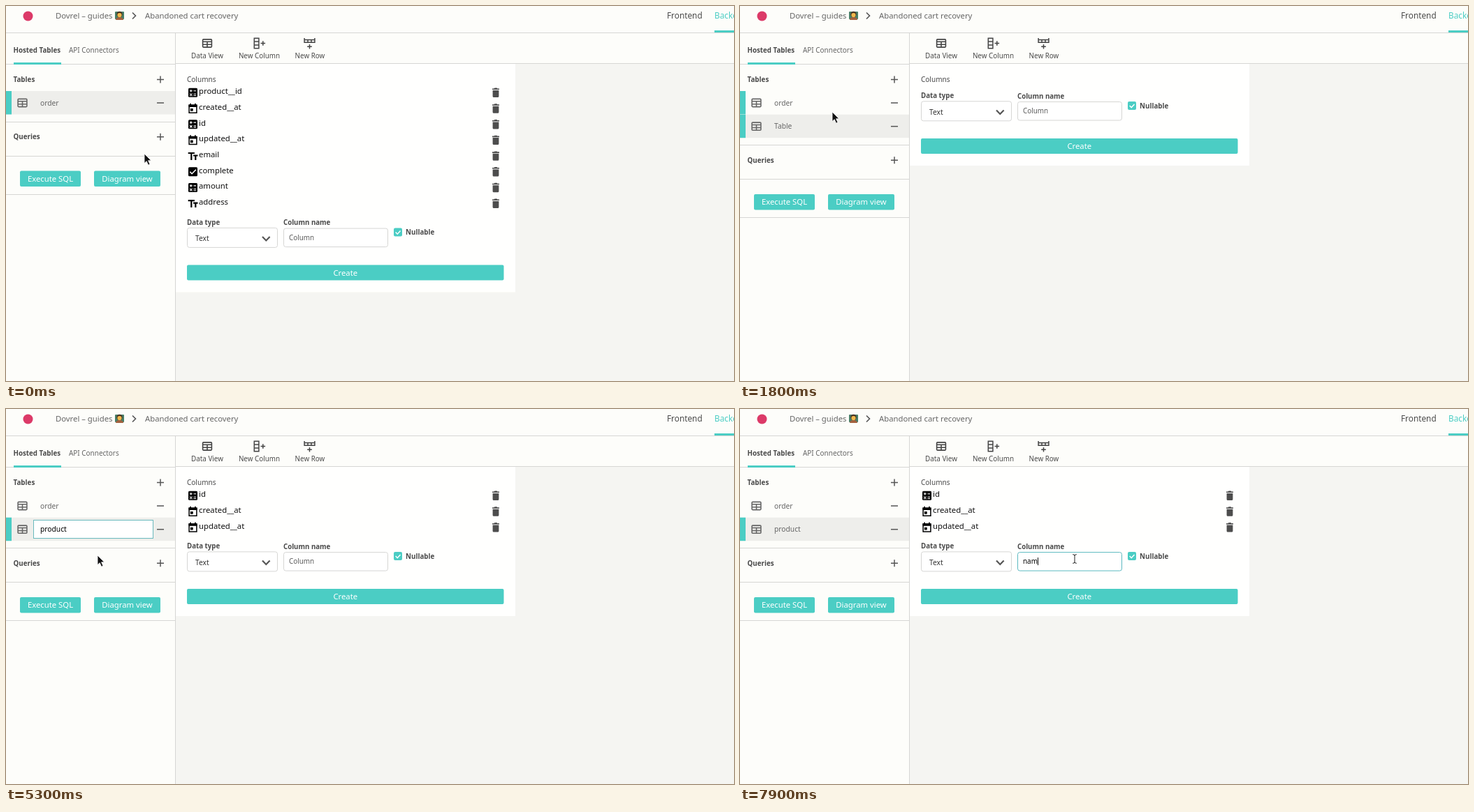
Animation of 1042 by 538 pixels, one loop 8 s. Source, as an HTML page:

```html
<!DOCTYPE html>
<html lang="en">
<head>
<meta charset="utf-8">
<title>Table editor</title>
<style>
html, body { margin: 0; width: 100%; height: 100%; overflow: hidden; background: #f5f5f2; }
svg { display: block; width: 1042px; height: 538px; font-family: "Noto Sans", "Open Sans", sans-serif; }
</style>
</head>
<body>
<svg id="stage" viewBox="0 0 1042 538" xmlns="http://www.w3.org/2000/svg">
  <defs>
    <g id="plus"><path d="M-5 0H5M0-5V5" fill="none" stroke-width="1.5"/></g>
    <g id="minus"><path d="M-5 0H5" fill="none" stroke="#555" stroke-width="1.5"/></g>
    <g id="grid" fill="none" stroke-width="1.6">
      <rect x="-6.4" y="-5.6" width="12.8" height="11.2" rx="1"/>
      <path d="M-6.4-2.2H6.4M-6.4 1.8H6.4M0-2.2V5.6"/>
    </g>
    <g id="addColumn" fill="none" stroke="#444" stroke-width="1.5">
      <path d="M-7.2-7.2H-.6V7.2H-7.2ZM-7.2-2.4H-.6M-7.2 2.4H-.6M2 0H8.6M5.3-3.3V3.3"/>
    </g>
    <g id="addRow" fill="none" stroke="#444" stroke-width="1.5">
      <path d="M-7.4-7.6V-1.2H7.4V-7.6M-7.4-5H7.4M-2.5-5V-1.2M2.5-5V-1.2M0 1.5V8M-3.3 4.8H3.3"/>
    </g>
    <g id="number">
      <rect x="-6.5" y="-6.5" width="13" height="13" rx="1.5"/>
      <path d="M-4.6-2.6H-.8M-2.7-4.5V-.7M1-2.6H4.6M-4.4 1.4L-1 4.8M-1 1.4L-4.4 4.8M1 2H4.6M1 4.2H4.6" stroke="#fff" stroke-width="1.1"/>
    </g>
    <g id="date">
      <path d="M-5.4-4.8H5.4V6.2H-5.4Z" fill="none" stroke="#000" stroke-width="1.5"/>
      <path d="M-6-5.4H6V-2H-6ZM-4.2-7.2H-2.6V-5H-4.2ZM2.6-7.2H4.2V-5H2.6ZM-3.6 0H.2V3.8H-3.6Z"/>
    </g>
    <g id="text">
      <path d="M-6.8-5.2H2.4V-3H-1.1V5.8H-3.3V-3H-6.8ZM.6-1.7H7V.5H4.9V5.8H2.7V.5H.6Z"/>
    </g>
    <g id="bool">
      <rect x="-6.5" y="-6.5" width="13" height="13" rx="1.5"/>
      <path d="M-4.2 0L-1.4 2.9L4.4-3" fill="none" stroke="#fff" stroke-width="1.6"/>
    </g>
    <g id="trash" fill="#4d4d4d">
      <path d="M-5-5.8H-2.5L-1.6-6.7H1.6L2.5-5.8H5V-4.2H-5ZM-4.4-3.3H4.4V5.2Q4.4 6.7 2.9 6.7H-2.9Q-4.4 6.7-4.4 5.2Z"/>
    </g>
    <g id="arrow">
      <path d="M0 0V13.6L3.2 10.7L5.6 16.2L8 15.1L5.6 9.8H9.8Z" fill="#111" stroke="#fff" stroke-width=".8"/>
    </g>
    <g id="hand">
      <path d="M-1.5 1Q0-.7 1.3 1V5Q2.5 3.9 3.5 5.2Q4.8 4.3 5.7 5.7Q7.6 5.2 7.6 7.3V9.6Q7.3 11.3 6.4 12.9H-.2Q-2-9.9-.2 12.9Q-1.7 10.2-4.5 7.4Q-4.2 5.2-1.5 7.5Z" fill="#fff" stroke="#222" stroke-width="1.1" stroke-linejoin="round"/>
    </g>
    <g id="beam">
      <path d="M-2.8-6.3Q0-6.3 0-4.8Q0-6.3 2.8-6.3M0-5V5M-2.8 6.3Q0 6.3 0 4.8Q0 6.3 2.8 6.3" fill="none" stroke="#222"/>
    </g>
  </defs>
  <g id="scene"></g>
</svg>
<script>
const TEAL = '#4bcdc4', PINK = '#dc3a68', LINE = '#d6d6d4', INK = '#4a4a4a';
const LOOP = 8000, STEP = 100, ROW = 22.7;
const scene = document.getElementById('scene');

const ORDER_COLUMNS = [
  ['number', 'product__id'], ['date', 'created__at'], ['number', 'id'], ['date', 'updated__at'],
  ['text', 'email'], ['bool', 'complete'], ['number', 'amount'], ['text', 'address']
];
const PRODUCT_COLUMNS = [['number', 'id'], ['date', 'created__at'], ['date', 'updated__at']];

// time, x, y of the pointer
const POINTER = [
  [200, 198, 212], [1100, 227, 100], [1500, 227, 100], [1800, 132, 152],
  [1900, 132, 152], [2500, 88, 174], [4800, 88, 174], [5300, 131, 210],
  [5500, 355, 324], [5600, 355, 324], [6100, 421, 374], [6200, 421, 374], [6800, 479, 215]
];
const RENAME_KEYS = [[3400, 'p'], [3500, 'pr'], [3600, 'pro'], [3800, 'prod'], [4000, 'produ'], [4100, 'produc'], [4400, 'product']];
const NAME_KEYS = [[7700, 'n'], [7800, 'na'], [7900, 'nam']];

const typed = (keys, t, before) => keys.reduce((text, [at, value]) => t >= at ? value : text, before);

function pointerAt(t) {
  const next = POINTER.findIndex(key => key[0] > t);
  if (next === 0) return POINTER[0].slice(1);
  if (next < 0) return POINTER[POINTER.length - 1].slice(1);
  const [t0, x0, y0] = POINTER[next - 1], [t1, x1, y1] = POINTER[next];
  const p = (t - t0) / (t1 - t0), e = p * p * (3 - 2 * p);
  return [x0 + (x1 - x0) * e, y0 + (y1 - y0) * e];
}

const inside = ([px, py], x, y, w, h) => px >= x && px <= x + w && py >= y && py <= y + h;
const rect = (x, y, w, h, fill, more = '') => `<rect x="${x}" y="${y}" width="${w}" height="${h}" fill="${fill}" ${more}/>`;
const field = (x, y, w, h, stroke = LINE) => rect(x + .5, y + .5, w - 1, h - 1, '#fff', `rx="3" stroke="${stroke}"`);
const label = (x, y, text, size = 9.85, fill = INK, weight = 400, more = '') =>
  `<text x="${x}" y="${y}" font-size="${size}" fill="${fill}" font-weight="${weight}" ${more}>${text}</text>`;
const centered = (x, y, text, size, fill, weight) => label(x, y, text, size, fill, weight, 'text-anchor="middle"');
const icon = (name, x, y, stroke = '#555') => `<use href="#${name}" x="${x}" y="${y}" stroke="${stroke}"/>`;
const shape = name => `<use href="#${name}"`;
const solid = (name, x, y) => `${shape(name)} x="${x}" y="${y}"/>`;
const button = (x, y, w, h, text) => rect(x, y, w, h, TEAL, 'rx="2"') + centered(x + w / 2, y + h / 2 + 4, text, 11.3, '#fff');

function header() {
  return rect(0, 0, 1042, 38, '#fdfdfa') + rect(0, 38, 1042, 1, LINE) +
    `<circle cx="31.5" cy="14.5" r="7" fill="${PINK}"/>` +
    label(71, 18, 'Dovrel – guides', 11.3, '#666') +
    rect(156, 8, 13, 11, '#477f68', 'rx="1"') +
    `<circle cx="162.5" cy="12" r="4.2" fill="#4b3426"/><circle cx="162.5" cy="13" r="3.1" fill="#f0b94c"/>` +
    `<path d="M157 20Q157.500 16 162.500 16T168 20Z" fill="#a5623f"/>` +
    `<path d="M181 9.500L185.500 14L181 18.500" fill="none" stroke="#555" stroke-width="1.6"/>` +
    label(199, 18, 'Abandoned cart recovery', 11.3, '#666') +
    label(946, 18, 'Frontend', 11.8) + label(1014, 18, 'Backend', 11.8, TEAL) +
    rect(1014, 35, 28, 3, TEAL);
}

function toolbar() {
  return rect(243, 39, 799, 43, '#fdfdfa') + rect(243, 82, 799, 1, LINE) +
    icon('grid', 288, 53.5, '#444') + solid('addColumn', 362.5, 53.5) + solid('addRow', 434.5, 53.5) +
    centered(288, 74.5, 'Data View') + centered(362.5, 74.5, 'New Column') + centered(435, 74.5, 'New Row');
}

function tableRow(y, name, selected, bar, color = '#666') {
  return (selected ? rect(0, y, 242, 33.5, '#eeeeeb') : '') +
    (bar ? rect(0, y, 8, 33.5, TEAL) : '') +
    icon('grid', 23.5, y + 17, '#666') + label(49, y + 20.5, name, 10.25, color) + solid('minus', 221, y + 17);
}

function sidebar(t, pointer) {
  const added = t >= 1300, editing = t >= 2600 && t < 6000;
  const shift = added ? 33.5 : 0;
  const plusHot = inside(pointer, 214, 97, 15, 16);
  const hover = y => inside(pointer, 0, y, 242, 33.5);
  const gray = Math.round(102 * Math.min(1, Math.max(0, (t - 6900) / 400)));
  const nameColor = t < 3400 ? '#666' : `rgb(${gray},${gray},${gray})`;
  const name = typed(RENAME_KEYS, t, 'Table');
  let out = rect(0, 39, 242, 499, '#fdfdfa') + rect(242, 39, 1, 499, LINE) +
    label(10.5, 66.5, 'Hosted Tables', 9.75, INK, 700) + label(90, 66.5, 'API Connectors', 9.95, '#666') +
    rect(0, 83, 242, 1, LINE) + rect(11, 81, 68, 3, TEAL) +
    label(10.5, 108.5, 'Tables', 9.85, INK, 700) + icon('plus', 221, 105.5, plusHot ? PINK : '#555') +
    tableRow(122, 'order', !added, !added || hover(122));
  if (added) out += tableRow(155.7, editing ? '' : name, true, true, nameColor);
  if (editing) {
    out += rect(39.5, 159.5, 171, 26, '#fff', 'stroke="#69b9bd"') +
      label(49, 176.2, name, 10.25, t < 3400 ? '#555' : '#000');
  }
  return out + [166, 215, 270].map(y => rect(0, Math.floor(y + shift), 242, 1, LINE)).join('') +
    label(10.5, 191 + shift, 'Queries', 9.8, INK, 700) + icon('plus', 221, 187.8 + shift) +
    button(20, 236.5 + shift, 87, 22.5, 'Execute SQL') + button(126, 236.5 + shift, 95, 22.5, 'Diagram view');
}

function columnInput(t, dy) {
  const focused = t >= 6800, typing = t >= 7700;
  const border = t >= 7200 ? '#5cb9c0' : focused ? '#a3adb3' : LINE;
  let out = field(397, 137 + dy, 150, 27.500, border) +
    label(405, 154 + dy, typed(NAME_KEYS, t, 'Column'), 9.9, typing ? '#000' : '#5c5c5c', 400, 'id="columnName"');
  if (focused) out += rect(0, 145 + dy, 1, 11, '#111', 'id="caret"');
  if (focused && !typing) {
    out += `<path d="M405 ${155.5 + dy}${'q1 -1.600 2 0t2 0'.repeat(9)}" fill="none" stroke="#e0506a" stroke-width=".9"/>`;
  }
  return out;
}

function panel(t, columns, dy) {
  const rows = columns.map(([type, name], i) => {
    const y = 124.3 + i * ROW;
    return solid(type, 267.5, y) + label(276, y + 1.9, name, 11.35, '#111', 500) + solid('trash', 701, y);
  });
  return rect(243, 83, 486, 146 + dy, '#fffffe') + label(259, 109, 'Columns', 10) + rows.join('') +
    label(259, 132 + dy, 'Data type', 9.7, INK, 600) + label(397, 132.7 + dy, 'Column name', 9.7, INK, 600) +
    field(259, 136.300 + dy, 130, 29) + label(271, 155.800 + dy, 'Text', 10.2, '#333', 500) +
    `<path d="M367 ${149.5 + dy}l5.300 5.400l5.300-5.400" fill="none" stroke="#555" stroke-width="2.200"/>` +
    columnInput(t, dy) +
    rect(555, 137 + dy, 12, 12, TEAL, 'rx="2"') +
    `<path d="M557.700 ${143 + dy}l2.500 2.600l4.300-4.700" fill="none" stroke="#fff" stroke-width="1.500"/>` +
    label(572, 146.700 + dy, 'Nullable', 9.8, INK, 600) +
    button(259, 190 + dy, 453.5, 22, 'Create');
}

function cursor(t, pointer, dy) {
  const onLink = inside(pointer, 214, 97, 15, 16) || inside(pointer, 259, 190 + dy, 453, 22);
  const onText = t >= 2600 && t < 6000 && inside(pointer, 39, 159, 172, 27) || inside(pointer, 397, 137 + dy, 150, 27);
  return solid(onText ? 'beam' : onLink ? 'hand' : 'arrow', ...pointer.map(v => Math.round(v)));
}

function draw(t) {
  const pointer = pointerAt(t);
  const columns = t < 1300 ? ORDER_COLUMNS : t < 4700 ? [] : PRODUCT_COLUMNS;
  const dy = columns.length * ROW;
  scene.innerHTML = rect(0, 0, 1042, 538, '#f5f5f2') + panel(t, columns, dy) + header() + toolbar() +
    sidebar(t, pointer) + cursor(t, pointer, dy);
  const caret = document.getElementById('caret');
  if (caret) caret.setAttribute('x', Math.round(405 + document.getElementById('columnName').getComputedTextLength()));
}

let shown = -1;
function tick() {
  const t = Math.floor(performance.now() % LOOP / STEP) * STEP;
  if (t !== shown) draw(shown = t);
  requestAnimationFrame(tick);
}
tick();
</script>
</body>
</html>
```
